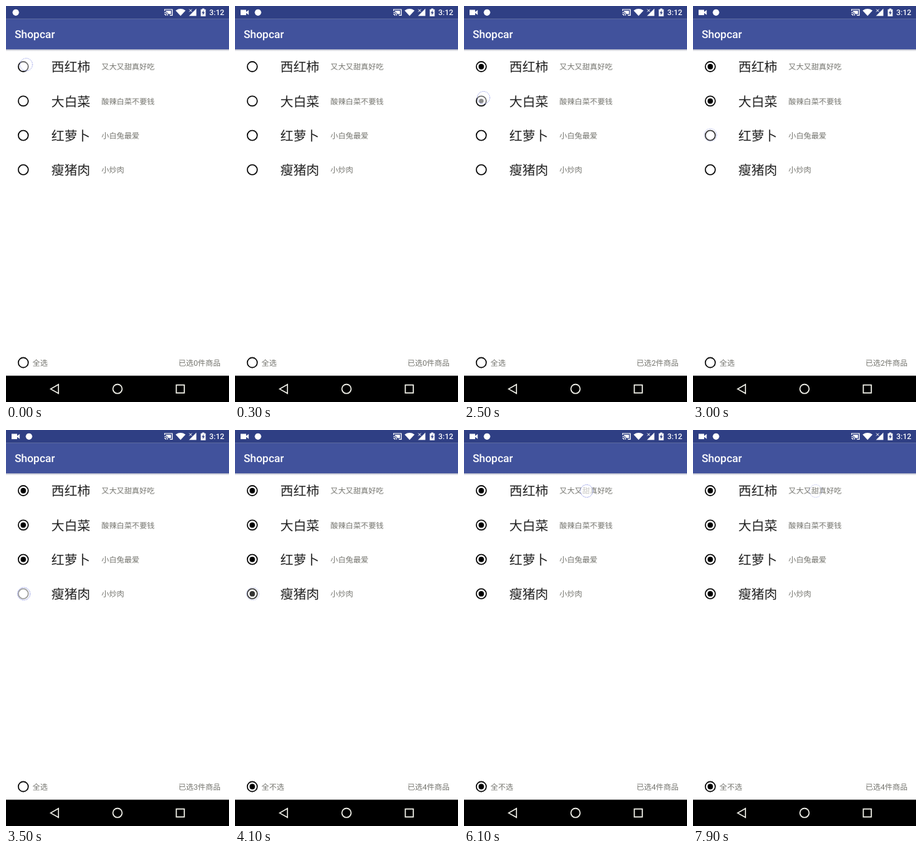
Recreate the animation shown at these times as an HTML page with a canvas. Size 320 px wide and 568 px high, loop 8000 ms.

```html
<!DOCTYPE html>
<html lang="zh">
<head>
<meta charset="utf-8">
<title>Shopcar</title>
<style>
  html, body { margin: 0; width: 100%; height: 100%; overflow: hidden; background: #fff; }
  canvas { display: block; width: 320px; height: 568px; }
</style>
</head>
<body>
<canvas id="stage"></canvas>
<script>
const W = 320, H = 568, LOOP = 8000, STEP = 100;
const FONT = 'Roboto, "Noto Sans CJK SC", "Noto Sans CJK", sans-serif';
const INK = '#202020', GREY = '#74746e', STATUS = '#2f3f84', BAR = '#41529c';
const canvas = document.getElementById('stage');
const ctx = canvas.getContext('2d');
const ratio = window.devicePixelRatio || 1;
canvas.width = W * ratio;
canvas.height = H * ratio;
ctx.textRendering = 'geometricPrecision';

const rows = [
  { name: '西红柿', note: '又大又甜真好吃', pick: 1900 },
  { name: '大白菜', note: '酸辣白菜不要钱', pick: 2400 },
  { name: '红萝卜', note: '小白兔最爱', pick: 3200 },
  { name: '瘦猪肉', note: '小炒肉', pick: 3900 },
];
const CLEAR_AT = 4700, SELECT_ALL_AT = 5800;

const touches = [
  { x: 29, y: 84, down: -500, up: -100 },
  { x: 22, y: 80, down: 1700, up: 1800 },
  { x: 28, y: 131.5, down: 2300, up: 2400 },
  { x: 25, y: 185, down: 3000, up: 3150 },
  { x: 25.6, y: 235, down: 3300, up: 3900, show: 3500 },
  { x: 32, y: 513, down: 4500, up: 4700, show: 4600 },
  { x: 30, y: 512, down: 5700, up: 5800 },
  { x: 176, y: 87.5, down: 5900, up: 7400, show: 6100, fade: 600 },
];

const clamp = v => Math.max(0, Math.min(1, v));

function text(str, x, y, size, color, weight = 400, align = 'left') {
  ctx.font = `${weight} ${size}px ${FONT}`;
  ctx.textAlign = align;
  ctx.fillStyle = color;
  ctx.fillText(str, x, y);
}

function rect(x, y, w, h, color) {
  ctx.fillStyle = color;
  ctx.fillRect(x, y, w, h);
}

function path(points, closed = true) {
  ctx.beginPath();
  points.forEach(([x, y]) => ctx.lineTo(x, y));
  if (closed) ctx.closePath();
}

function circle(x, y, r, start = 0, end = Math.PI * 2) {
  ctx.beginPath();
  ctx.arc(x, y, r, start, end);
}

function fill(color) { ctx.fillStyle = color; ctx.fill(); }

function stroke(color, width) {
  ctx.strokeStyle = color;
  ctx.lineWidth = width;
  ctx.stroke();
}

function radio(x, y, amount) {
  circle(x, y, 7.1);
  stroke('#080808', 1.6);
  if (amount > 0) {
    ctx.globalAlpha = amount;
    circle(x, y, 3.9 * (0.4 + 0.6 * amount));
    fill('#000');
    ctx.globalAlpha = 1;
  }
}

// Dot size of a radio switched on at the given time, before or after the reset.
function dotAmount(t, pick) {
  if (t >= SELECT_ALL_AT) return clamp((t - SELECT_ALL_AT + 50) / 200);
  if (t >= CLEAR_AT) return 1 - clamp((t - CLEAR_AT + 100) / 150);
  return t < pick ? 0 : clamp((t - pick + 50) / 200);
}

function castIcon() {
  path([[227.6, 7], [227.6, 5], [238.6, 5], [238.6, 13.3], [235, 13.3]], false);
  stroke('#fff', 1.2);
  rect(229.4, 6.8, 7.4, 4.8, '#fff');
  circle(227, 14, 6.4, -Math.PI / 2, 0);
  ctx.lineTo(227, 14);
  fill(STATUS);
  for (const r of [2.2, 4.6]) {
    circle(227.3, 13.8, r, -Math.PI / 2, 0);
    stroke('#fff', 1.2);
  }
}

function signalIcon() {
  path([[262.6, 14.3], [273.2, 3.8], [273.2, 14.3]]);
  fill('#fff');
  for (const [y1, y2] of [[4.6, 8.4], [8.4, 4.6]]) {
    path([[263, y1], [266.8, y2]], false);
    stroke('#fff', 1);
  }
}

function statusBar(t) {
  rect(0, 0, W, 18.7, STATUS);
  const recording = t >= 100;
  if (recording) {
    rect(8, 5.5, 8, 7.6, '#fff');
    path([[16, 8.6], [19.6, 5.8], [19.6, 12.8], [16, 10]]);
    fill('#fff');
  }
  circle(recording ? 33 : 14, 9.3, 4.6);
  fill('#fff');

  castIcon();

  ctx.beginPath();
  ctx.moveTo(250.5, 14.2);
  ctx.lineTo(243.4, 6.4);
  ctx.quadraticCurveTo(250.5, 1.6, 257.6, 6.4);
  ctx.closePath();
  fill('#fff');

  signalIcon();

  rect(279.5, 4.8, 7, 9.9, '#fff');
  rect(281.5, 3.6, 3, 1.4, '#fff');
  path([[283.6, 6], [280.9, 10.3], [282.6, 10.3], [282.4, 13.2], [285.1, 9], [283.5, 9]]);
  fill(STATUS);

  text('3:12', 313.3, 13.4, 10.9, '#fff', 500, 'right');
}

function appBar() {
  rect(0, 18.7, W, 43.5, BAR);
  const shadow = ctx.createLinearGradient(0, 62, 0, 65);
  shadow.addColorStop(0, 'rgba(40,50,90,.35)');
  shadow.addColorStop(1, 'rgba(40,50,90,0)');
  rect(0, 62.2, W, 3, shadow);
  text('Shopcar', 12.4, 46.3, 15.6, '#fff', 500);
}

function navBar() {
  rect(0, 530.3, W, 37.7, '#000');
  path([[64, 549.3], [75.3, 542.9], [75.3, 555.7]]);
  stroke('#f4f4ec', 1.5);
  circle(160, 549.2, 6.6);
  stroke('#f4f4ec', 1.6);
  ctx.strokeRect(244.4, 543.6, 11.4, 11.4);
}

function touchRing(t, { x, y, down, up, show = down, fade = 300 }) {
  if (t < show) return;
  const alpha = Math.min(clamp((t - down + 100) / 300), clamp(1 - (t - up) / fade));
  if (alpha <= 0) return;
  circle(x, y, 9);
  fill(`rgba(255,255,255,${0.6 * alpha})`);
  ctx.setLineDash([1.5, 1]);
  stroke(`rgba(130,140,225,${0.4 + 0.5 * alpha})`, 1);
  ctx.setLineDash([]);
}

function draw(t) {
  ctx.setTransform(ratio, 0, 0, ratio, 0, 0);
  rect(0, 0, W, H, '#fff');
  appBar();
  statusBar(t);

  rows.forEach(({ name, note, pick }, i) => {
    const y = 87 + i * 49.3;
    radio(24.8, y, dotAmount(t, pick));
    text(name, 65, y + 7.4, 18.67, INK);
    text(note, 137, y + 4.2, 10.9, GREY);
  });

  const cleared = t >= CLEAR_AT && t < SELECT_ALL_AT;
  const count = cleared ? 0 : rows.filter(r => t >= r.pick).length;
  radio(24.8, 511.5, dotAmount(t, rows[3].pick));
  text(count === rows.length ? '全不选' : '全选', 38, 515.8, 10.9, GREY);
  text(`已选${count}件商品`, 308, 515.8, 10.9, GREY, 400, 'right');

  touches.forEach(touch => touchRing(t, touch));
  navBar();
}

const start = performance.now();
function tick() {
  const t = (performance.now() - start) % LOOP;
  draw(Math.floor(t / STEP) * STEP);
  requestAnimationFrame(tick);
}
tick();
</script>
</body>
</html>
```
